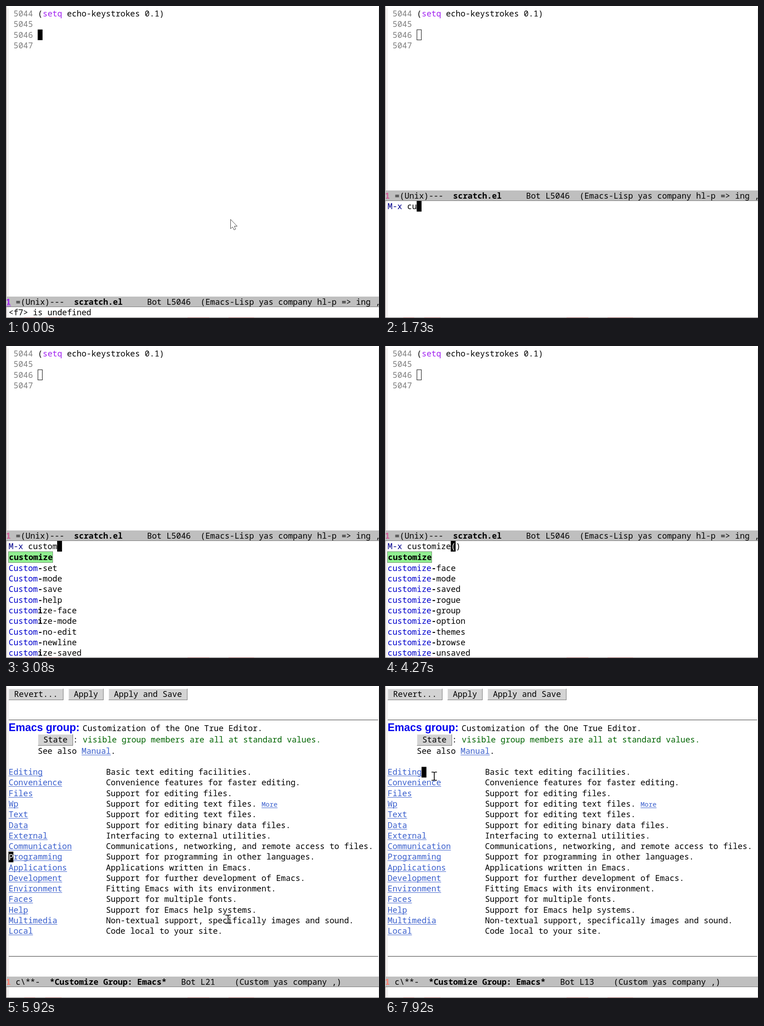
Write an HTML page with a canvas that moves like this. It is 818x685 px and loops after 7990 ms.

```html
<!DOCTYPE html>
<html lang="en">
<head>
<meta charset="utf-8">
<title>Editor: customize</title>
<style>
html, body { margin: 0; width: 100%; height: 100%; overflow: hidden; background: #fff; }
canvas { display: block; }
</style>
</head>
<body>
<canvas id="stage" width="818" height="685"></canvas>
<script>
const ctx = document.getElementById('stage').getContext('2d');
const LOOP = 7990, CELL = 32 / 3, FONT_SIZE = CELL / .6, ROW = 23.3, LEFT = 5.8;
const LINK = '#3a5fcd', PURPLE = '#a020f0', MATCH = '#0000cd';
const col = n => LEFT + n * CELL;

function rect(x, y, w, h, color) {
  ctx.fillStyle = color;
  ctx.fillRect(x, y, w, h);
}

function frame(x, y, w, h, color) {
  ctx.strokeStyle = color;
  ctx.lineWidth = 1;
  ctx.strokeRect(x + .5, y + .5, w - 1, h - 1);
}

// Draws monospaced text and returns the x where it ends.
function put(x, y, text, color = '#000', bold = false, size = FONT_SIZE) {
  ctx.font = `${bold ? 'bold ' : ''}${size}px "Noto Sans Mono", monospace`;
  ctx.fillStyle = color;
  ctx.fillText(text, x, y);
  return x + text.length * size * .6;
}

function link(x, y, text, size) {
  const end = put(x, y, text, LINK, false, size);
  rect(x, Math.round(y) + 2, end - x, 1, LINK);
}

function block(x, top, char = '') {
  rect(x - .3, top, CELL, 23.4, '#000');
  put(x, top + 18, char, '#fff');
}

function button(x, y, w, label) {
  rect(x, y, w, 25, '#d3d3d3');
  rect(x, y, w, 1, '#eee');
  rect(x, y, 1, 25, '#eee');
  rect(x, y + 24, w, 1, '#777');
  rect(x + w - 1, y, 1, 25, '#777');
  put(x + 1 + CELL, y + 18, label);
}

function modeLine(top, digitColor, flags, name, rest, underlined) {
  rect(0, top, 818, 23, '#bfbfbf');
  rect(0, top + 22, 818, 1, '#777');
  const y = top + 18;
  put(0, y, '1', digitColor, true);
  if (underlined) rect(0, y + 2, 11, 1, digitColor);
  let x = put(2 * CELL, y, flags);
  x = put(x, y, name, '#000', true);
  put(x, y, rest);
}

function windowEdges() {
  rect(0, 0, 818, 685, '#fff');
  rect(1, 5, 5, 679, '#f2f0f0');
  rect(816, 5, 2, 679, '#f0f0f0');
  rect(0, 0, 1, 685, '#8c7f7f');
  rect(0, 684, 818, 1, '#615b5b');
  for (const [x, w] of [[40, 24], [86, 36], [398, 48], [488, 56]]) rect(x, 684, w, 1, '#6b3030');
}

// ---- Minibuffer completion ----

const customNames = ['customize', 'Custom-set', 'Custom-mode', 'Custom-save', 'Custom-help',
  'customize-face', 'customize-mode', 'Custom-no-edit', 'Custom-newline', 'customize-saved'];
const customizeNames = ['customize', ...['face', 'mode', 'saved', 'rogue', 'group', 'option',
  'themes', 'browse', 'unsaved'].map(s => 'customize-' + s)];
const cuNames = ['cua-mode', 'customize', 'Custom-set', 'Custom-mode', 'Custom-save',
  'Custom-help', 'cua-set-mark', 'customize-face', 'customize-mode', 'Custom-no-edit'];
const cNames = ['cd', 'calc', 'c-mode', 'compile', 'c++-mode', 'calendar', 'cua-mode',
  'copy-file', 'customize', 'center-line'];

// [start, typed text, candidates, common remainder]
const typing = [
  [860, '', []], [1260, 'c', []], [1330, 'c', cNames], [1730, 'cu', []], [1800, 'cu', cuNames],
  [2000, 'cus', customNames, 'tom'], [2260, 'cust', customNames, 'om'],
  [2730, 'custo', customNames, 'm'], [3080, 'custom', customNames],
  [3610, 'customi', customizeNames, 'ze'], [3940, 'customiz', customizeNames, 'e'],
  [4270, 'customize', customizeNames, '']
];

function candidates(names, matched) {
  names.forEach((name, i) => {
    if (i === 0) {
      const w = Math.round(name.length * CELL) + 2;
      rect(5, 451, w, 25, '#90ee90');
      frame(5, 451, w, 25, '#6f8f6f');
      put(LEFT + .7, 470, name, '#000', true);
      return;
    }
    const y = 493.7 + (i - 1) * ROW;
    let x = put(LEFT, y, name.slice(0, matched), MATCH);
    x = put(x, y, name[matched] || '', '#000', true);
    put(x, y, name.slice(matched + 1));
  });
}

function prompt(top, [, typed, names, rest]) {
  const y = top + 18;
  let x = put(LEFT, y, 'M-x ', '#00008b');
  x = put(x, y, typed);
  const hinted = rest !== undefined;
  block(x, top, hinted ? '(' : '');
  if (hinted) {
    x = put(x + CELL, y, rest.slice(0, 1), '#000', true);
    put(x, y, rest.slice(1) + ')');
  }
  candidates(names, typed.length);
}

function scratchScreen(t) {
  for (let i = 0; i < 4; i++) put(col(1), 23 + i * ROW, String(5044 + i), '#7f7f7f');
  let x = put(col(6), 23, '(');
  x = put(x, 23, 'setq', PURPLE);
  put(x, 23, ' echo-keystrokes 0.1)');

  const active = t >= 860, grown = t >= 930;
  if (active) frame(69.5, 51.6, CELL, 23.4, '#000');
  else block(col(6), 51.6);

  modeLine(grown ? 405 : 638, grown ? '#d0609a' : PURPLE, '=(Unix)---  ', 'scratch.el',
    '     Bot L5046  (Emacs-Lisp yas company hl-p => ing ,', !grown);
  if (active) prompt(grown ? 428 : 661, typing.findLast(step => t >= step[0]));
  else put(LEFT, 679, '<f7> is undefined');
  if (t < 1260) arrow(492, 468);
}

// ---- Customize buffer ----

const groups = [
  ['Editing', 'Basic text editing facilities.'],
  ['Convenience', 'Convenience features for faster editing.'],
  ['Files', 'Support for editing files.'],
  ['Wp', 'Support for editing text files.'],
  ['Text', 'Support for editing text files.'],
  ['Data', 'Support for editing binary data files.'],
  ['External', 'Interfacing to external utilities.'],
  ['Communication', 'Communications, networking, and remote access to files.'],
  ['Programming', 'Support for programming in other languages.'],
  ['Applications', 'Applications written in Emacs.'],
  ['Development', 'Support for further development of Emacs.'],
  ['Environment', 'Fitting Emacs with its environment.'],
  ['Faces', 'Support for multiple fonts.'],
  ['Help', 'Support for Emacs help systems.'],
  ['Multimedia', 'Non-textual support, specifically images and sound.'],
  ['Local', 'Code local to your site.']
];
const GROUP_TOP = 177.5, GROUP_ROW = 23.27, CLICK = 7720;

// [time, x, y] of the pointer hot spot
const path = [
  [5920, 487, 512], [6040, 455, 540], [6130, 400, 547], [6300, 290, 500], [6500, 190, 370],
  [6680, 120, 259], [6750, 121, 259], [6960, 130, 252], [7160, 122, 228], [7230, 117, 203],
  [7300, 113, 190], [7440, 109, 174], [7600, 108, 180], [7720, 108, 190], [7920, 108, 198]
];
const bursts = [[5920, 6680], [6750, 6960], [7160, 7920]];

function pointerAt(t) {
  const [start, end] = bursts.findLast(b => t >= b[0]);
  const time = t >= end ? end : start + Math.floor((t - start) / 70) * 70;
  const next = path.findIndex(p => p[0] >= time);
  if (next <= 0) return path[0].slice(1);
  const [a, b] = [path[next - 1], path[next]];
  const k = (time - a[0]) / (b[0] - a[0]);
  return [1, 2].map(i => Math.round(a[i] + (b[i] - a[i]) * k));
}

function customizeScreen(t) {
  button(6, 6, 120, 'Revert...');
  button(137, 6, 77, 'Apply');
  button(225, 6, 173, 'Apply and Save');
  rect(6, 74, 810, 1, '#333');

  ctx.font = 'bold 23.3px "Liberation Sans", Arial, sans-serif';
  ctx.fillStyle = '#0000ee';
  ctx.fillText('Emacs group:', LEFT, 99);
  put(168, 99, 'Customization of the One True Editor.');
  button(70, 106, 77, 'State');
  const x = put(147, 124, ': ');
  put(x, 124, 'visible group members are all at standard values.', '#006400');
  put(col(6), 149, 'See also ');
  link(col(15), 149, 'Manual');
  put(col(21), 149, '.');

  const pointer = t >= 5920 ? pointerAt(t) : null;
  const hovered = pointer && Math.floor((pointer[1] - GROUP_TOP) / GROUP_ROW);
  let overLink = false;
  groups.forEach(([name, text], i) => {
    const top = GROUP_TOP + i * GROUP_ROW, y = top + 17.7;
    if (pointer && hovered === i && pointer[0] < col(name.length)) {
      overLink = true;
      rect(LEFT, Math.round(top), name.length * CELL, 23, '#b4eeb4');
      put(LEFT, y, name);
    } else link(LEFT, y, name);
    put(col(20), y, text);
    if (name === 'Wp') link(col(52), y, 'More', 14.6);
  });

  const clicked = t >= CLICK;
  if (clicked) block(col(7), GROUP_TOP);
  else block(LEFT, GROUP_TOP + 8 * GROUP_ROW, 'P');
  rect(6, 593, 810, 1, '#333');
  modeLine(638, '#fa8072', 'c\\**-  ', '*Customize Group: Emacs*',
    `   Bot L${clicked ? 13 : 21}    (Custom yas company ,)`);
  if (pointer) (overLink ? hand : beam)(...pointer);
}

// ---- Mouse pointers ----

function shape(x, y, d, fill, stroke = '#000', width = 1.2) {
  ctx.save();
  ctx.translate(x, y);
  const p = new Path2D(d);
  ctx.lineWidth = width;
  ctx.lineJoin = 'round';
  ctx.strokeStyle = stroke;
  if (fill) {
    ctx.fillStyle = fill;
    ctx.fill(p);
  }
  ctx.stroke(p);
  ctx.restore();
}

const arrow = (x, y) =>
  shape(x, y, 'M.5 .5V21L5 17 8 23.5 11.5 22 8.8 15.5H15Z', '#fff', '#444', 1);

const beam = (x, y) =>
  shape(x, y, 'M-6 -9H-2L0 -8 2 -9H6M0 -8V8M-6 9H-2L0 8 2 9H6', null, '#000', 1.7);

const hand = (x, y) =>
  shape(x, y, 'M-1.5 1Q0 -1.5 1.5 1V8Q3.5 6 5 8.5Q7 7 8 9.5Q10.5 8.5 10.5 12V17L9 20V23H0V20'
    + 'L-4.5 13.5Q-5.5 10.5 -3 11L-1.5 13Z', '#fff', '#000', 1.4);

const begin = performance.now();

function draw() {
  const t = (performance.now() - begin) % LOOP;
  windowEdges();
  (t < 4670 ? scratchScreen : customizeScreen)(t);
  requestAnimationFrame(draw);
}
draw();
</script>
</body>
</html>
```
